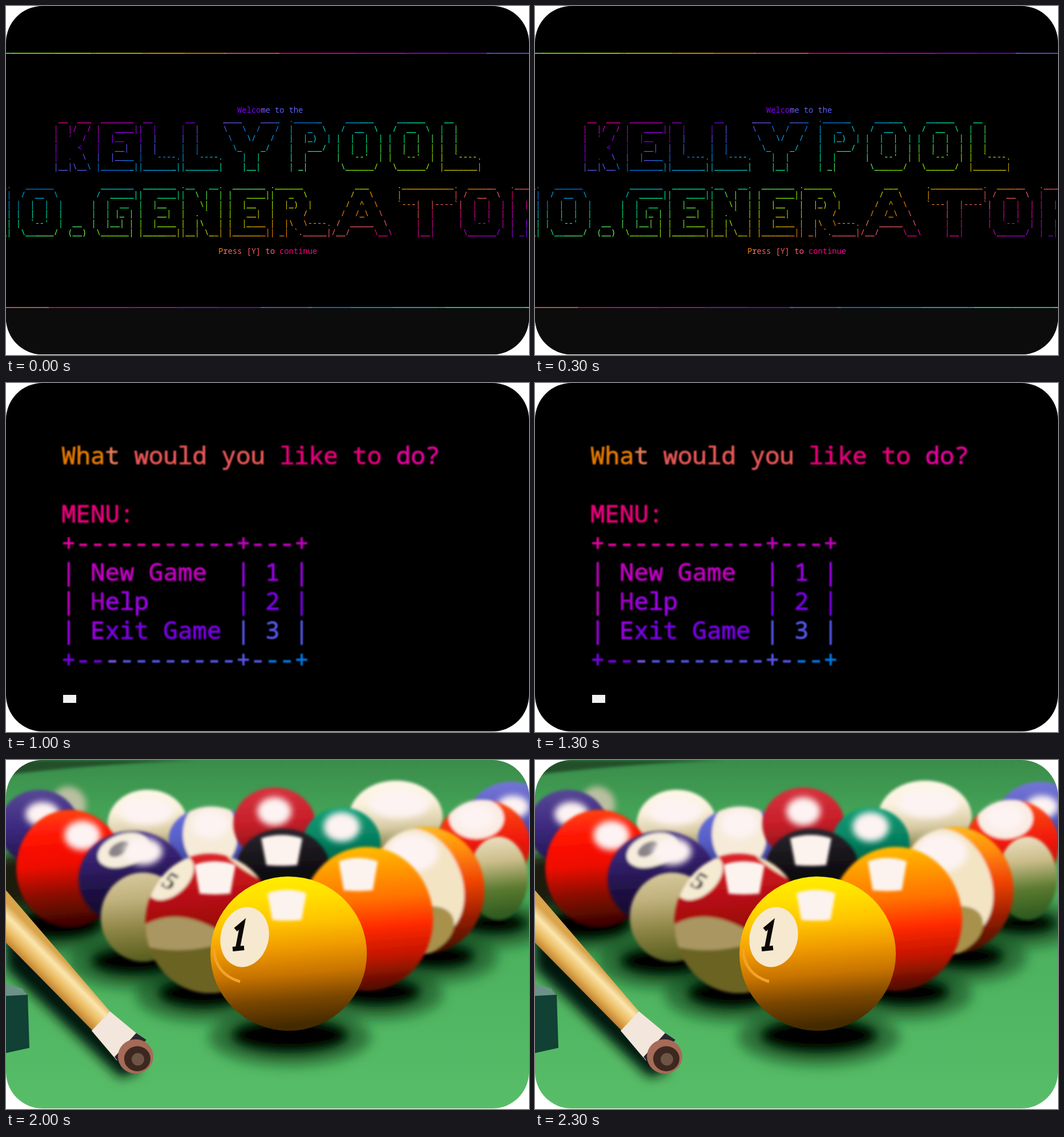
Write an HTML page that moves like this. It is 916 by 611 pixels and loops after 2.5 s.

```html
<!DOCTYPE html>
<html lang="en">
<head>
<meta charset="utf-8">
<title>Pool number generator</title>
<style>
html, body { margin: 0; width: 100%; height: 100%; overflow: hidden; background: #fff; }
svg { display: block; width: 100vw; height: 100vh; }
text { white-space: pre; }
.mono { font-family: "Noto Sans Mono", "DejaVu Sans Mono", monospace; stroke-width: 0; }
.crt { filter: blur(.8px); opacity: .9; }
.crt .mono { stroke-width: .9; }
.ui { font: 8.9px "Open Sans", "Noto Sans", sans-serif; fill: #ccc; }
</style>
</head>
<body>
<svg viewBox="0 0 916 611" xmlns="http://www.w3.org/2000/svg">
<defs>
  <clipPath id="card"><rect width="916" height="610" rx="64"/></clipPath>
  <filter id="soft" x="-20%" y="-20%" width="140%" height="140%"><feGaussianBlur stdDeviation="2.5"/></filter>
  <filter id="hazy" x="-40%" y="-40%" width="180%" height="180%"><feGaussianBlur stdDeviation="6"/></filter>
  <filter id="shade" x="-40%" y="-60%" width="180%" height="220%"><feGaussianBlur stdDeviation="10"/></filter>
  <linearGradient id="cloth" x1="0" y1="0" x2="0" y2="1">
    <stop offset="0" stop-color="#3a8c4a"/><stop offset=".14" stop-color="#43a256"/>
    <stop offset=".6" stop-color="#4eb360"/><stop offset="1" stop-color="#58bd68"/>
  </linearGradient>
  <linearGradient id="wood" gradientUnits="userSpaceOnUse" x1="70" y1="395" x2="108" y2="357">
    <stop offset="0" stop-color="#b9782a"/><stop offset=".35" stop-color="#e9b85c"/>
    <stop offset=".7" stop-color="#fbe6ae"/><stop offset="1" stop-color="#d9a44c"/>
  </linearGradient>
</defs>
<g clip-path="url(#card)">
  <g id="welcome"></g>
  <g id="rules"></g>
  <g id="menu"></g>
  <g id="editor"></g>
  <g id="table"></g>
</g>
</svg>

<script type="text/plain" id="glyphs">
K 9
 __  ___
|  |/  /
|  '  /
|    <
|  .  \
|__|\__\
E 9
 _______
|   ____|
|  |__
|   __|
|  |____
|_______|
L 9
 __
|  |
|  |
|  |
|  `----.
|_______|
Y 14
____    ____
\   \  /   /
 \   \/   /
  \_    _/
    |  |
    |__|
P 10
.______
|   _  \
|  |_)  |
|   ___/
|  |
| _|
O 11
  ______
 /  __  \
|  |  |  |
|  |  |  |
|  `--'  |
 \______/
N 10
.__   __.
|  \ |  |
|   \|  |
|  . `  |
|  |\   |
|__| \__|
. 5




 __
(__)
G 10
  _______
 /  _____|
|  |  __
|  | |_ |
|  |__| |
 \______|
R 13
.______
|   _  \
|  |_)  |
|      /
|  |\  \----.
| _| `._____|
A 14
     ___
    /   \
   /  ^  \
  /  /_\  \
 /  _____  \
/__/     \__\
T 13
.___________.
|           |
`---|  |----`
    |  |
    |  |
    |__|
</script>

<script>
const $ = id => document.getElementById(id);
const esc = s => s.replace(/&/g, '&amp;').replace(/</g, '&lt;');
const rect = (x, y, w, h, fill) => `<rect x="${x}" y="${y}" width="${w}" height="${h}" fill="${fill}"/>`;

// Terminal rainbow: three shifted sines snapped to the 6x6x6 colour cube
const LEVELS = [0, 95, 135, 175, 215, 255];
const COL_DEG = 2.1486, ROW_DEG = 17.189;

function rainbow(deg) {
  const channel = shift => LEVELS[Math.floor(6 * (Math.sin((deg + shift) * Math.PI / 180) * 127 + 128) / 256)];
  return `rgb(${[0, 120, 240].map(channel)})`;
}

// Splits a line into runs of one colour and hands each run to draw()
function runs(str, col, row, hue, draw) {
  const color = i => rainbow(hue + COL_DEG * (col + i) + ROW_DEG * row);
  let out = '';
  for (let i = 0, j; i < str.length; i = j) {
    j = i + 1;
    while (j < str.length && color(j) === color(i)) j++;
    out += draw(str.slice(i, j), col + i, color(i));
  }
  return out;
}

// grid: x, y of the first cell's baseline, pitch, lead, hue
function terminal(lines, g) {
  const body = lines.map(([row, col, str]) => runs(str, col, row, g.hue, (s, c, fill) =>
    s.trim() ? `<text x="${(g.x + c * g.pitch).toFixed(2)}" y="${(g.y + row * g.lead).toFixed(2)}" fill="${fill}" stroke="${fill}">${esc(s)}</text>` : ''));
  return `<g class="mono" font-size="${g.pitch / 0.6}">${body.join('')}</g>`;
}

const block = (str, col) => str.split('\n').slice(1).map((s, row) => [row, col, s]);

// Welcome screen
const font = {};
const src = $('glyphs').textContent.split('\n').slice(1);
for (let i = 0; i + 6 < src.length; i += 7) {
  const [name, width] = src[i].split(' ');
  font[name] = src.slice(i + 1, i + 7).map(s => s.padEnd(+width));
}
const banner = (word, row, col) => [0, 1, 2, 3, 4, 5].map(r =>
  [row + r, col, [...word].map(ch => font[ch][r]).join('')]);

const g0 = { x: 1.2, y: 186.5, pitch: 8.24, lead: 16.5, hue: 198.6 - 54 * COL_DEG };
const rule = (row, y) => runs('-'.repeat(113), -1, row, g0.hue, (s, c, fill) =>
  rect(g0.x + c * g0.pitch, y, s.length * g0.pitch, 1.5, fill));

$('welcome').innerHTML = rect(0, 0, 916, 611, '#000') + rect(0, 528, 916, 83, '#0c0c0c') +
  rule(-6, 82) + rule(21, 527) +
  terminal([
    [0, 49, 'Welcome to the'],
    ...banner('KELLYPOOL', 1, 10),
    ...banner('NO.GENERATOR', 8, -8),
    [15, 45, 'Press [Y] to continue']
  ], g0);

// Rules screen
const stars = '*'.repeat(33);
const rules = `
This app:
w game on the App
he number of players and enter in their name.
will generate and allocate numbers to each player.
 app to the correct person when their name appears on the screen
rget to say 'Done' when you have finished memorizing your ball.

********

 Kelly Pool:
e is designed for 3-15 players from the age of 7+
 app to enter in the players names to produce a number.
umber has been allocated and shown (secretly) to each player you may begin the game
  table should have 15 coloured balls with numbers and one white ball with no numbers.
he white ball at the D and the remainder coloured balls in the shape of a triangle pointing to the last black
 table is set up, the first player should break the balls from the D and then pass the cue to the next person
yer will have a go until it returns to the first player for a second go

all has been sunk by another player, you are out of the game
her players balls have been sunk and yours still remains, you WIN the game!



${stars}
ack to the main menu, click ENTER
${stars}`;
$('rules').innerHTML = rect(0, 0, 916, 611, '#000') +
  terminal(block(rules, -1), { x: 1, y: 84, pitch: 8.68, lead: 17.375, hue: 198.6 - 47 * COL_DEG - 12 * ROW_DEG });

// Menu screen
const menu = `
What would you like to do?

MENU:
+-----------+---+
| New Game  | 1 |
| Help      | 2 |
| Exit Game | 3 |
+-----------+---+`;
$('menu').innerHTML = rect(0, 0, 916, 611, '#000') + '<g class="crt">' +
  terminal(block(menu, 0), { x: 97, y: 142, pitch: 25.5, lead: 51, hue: 78.4 - 3 * COL_DEG }) + '</g>' +
  rect(100, 546, 23, 14, '#f2f2f2');

// Editor
const code = String.raw`
def player_names
  players = Array.new
  system 'clear'
  puts "How many players?"
  numPlayers = gets.strip.to_i
  system 'clear'


    if (numPlayers < 3)
      puts "Invalid entry\nMinimum number of players is 3.\Try again"
      sleep 2
      system 'clear'
      player_names

    end

    if (numPlayers > 15)
      puts "Invalid entry\nMaximum number of players is 15.\Try again."
      sleep 2
      system 'clear'
      player_names

    end


  # for (runs through once)
  i = 1

  puts "Please enter in #{numPlayers} player names."
  while i <= numPlayers do
    begin
       puts "Player #{i} name?"
       name = gets.chomp
        #raise an exception
       raise StandardError if name ==""
       #increment until we reach no. of players
       players.push (name)
        i += 1`;

const span = (s, fill) => `<tspan fill="${fill}">${esc(s)}</tspan>`;
const STRING = /(\\[nT])|(#\{|\})|((?<=#\{)\w+)|./g;
const TOKEN = /(["'].*?["'])|\b(if|end|while|begin|do|def|raise)\b|\b(puts|sleep|system|gets|strip|to_i|chomp|push|(?<=def )player_names)\b|\b(\d+)\b|\b(Array)\b|\b(new)\b|\b(StandardError)\b|\w+|\W/g;
const STRING_INK = ['#d7ba7d', '#569cd6', '#9cdcfe'];
const TOKEN_INK = ['', '#c586c0', '#dcdcaa', '#b5cea8', '#4ec9b0', '#4fa8e0', '#9cdcfe'];

const paint = (str, re, ink, base) => str.replace(re, (m, ...groups) => {
  const i = groups.slice(0, ink.length).findIndex(Boolean);
  if (i === 0 && !ink[0]) return paint(m, STRING, STRING_INK, '#ce9178');
  return span(m, i < 0 ? base : ink[i]);
});

const codeLines = block(code, 0).map(([row, , str]) => {
  const s = str.trimStart();
  if (!s) return '';
  const x = 4 + (str.length - s.length - 6) * 5.587;
  const body = s[0] === '#' ? span(s, '#6a9955') : paint(s, TOKEN, TOKEN_INK, '#d4d4d4');
  return `<text x="${x.toFixed(2)}" y="${(85.2 + row * 13.81).toFixed(2)}">${body}</text>`;
});

const label = (x, y, s, fill = '#ccc', extra = '') => `<text class="ui" x="${x}" y="${y}" style="fill:${fill}" ${extra}>${s}</text>`;
const dot = (x, y) => `<circle cx="${x}" cy="${y}" r="4.2" fill="#cc3e44"/>`;
const tab = (x, w, tx, name, on) => rect(x, 22, w, 25, on ? '#1e1e1e' : '#2d2d2d') +
  dot(tx - 9, 34.3) + label(tx, 38, name, on ? '#fff' : '#969696');

$('editor').innerHTML = rect(0, 0, 916, 611, '#1e1e1e') +
  rect(0, 0, 916, 22, '#3c3c3c') + rect(0, 22, 916, 25, '#252526') +
  [[41, 'Go'], [64, 'Run'], [92, 'Terminal'], [140, 'Help']].map(([x, s]) => label(x, 14, s)).join('') +
  label(456.5, 14, 'people.rb - assignment [QVT: Ubuntu-18.04] - Candle Script Desk', '#ccc', 'text-anchor="middle"') +
  tab(0, 83, 20, 'menu.rb') + tab(84, 87, 107, 'people.rb', true) +
  tab(172, 110, 195, 'ball_numbers.rb') + tab(283, 85, 305, 'error.rb') +
  '<path d="M156 31l6 6m0-6l-6 6" stroke="#ddd"/>' +
  dot(-2, 55) + label(8, 58, 'people.rb', '#a9a9a9') +
  rect(0, 63, 916, 2, '#151515') +
  rect(0, 434, 916, 1, '#2b2b2b') + rect(0, 447, 916, 1, '#2b2b2b') +
  rect(4, 503, 1, 97, '#404040') +
  `<g class="mono" font-size="${5.587 / 0.6}">${codeLines.join('')}</g>`;

// Billiard table
let defs = '', balls = 0;
function ball(cx, cy, rx, ry, tones, inner = '', blur = true) {
  const id = 'ball' + balls++;
  const stops = tones.map((c, i) => `<stop offset="${i / (tones.length - 1)}" stop-color="${c}"/>`).join('');
  const shape = `<ellipse cx="${cx}" cy="${cy}" rx="${rx}" ry="${ry}"`;
  defs += `<linearGradient id="${id}" x1="0" y1="0" x2=".08" y2="1">${stops}</linearGradient><clipPath id="${id}c">${shape}/></clipPath>`;
  return `<g${blur ? ' filter="url(#soft)"' : ''}>${shape} fill="url(#${id})"/><g clip-path="url(#${id}c)">${inner}</g></g>`;
}
const oval = (cx, cy, rx, ry, fill, turn = 0, extra = '') =>
  `<ellipse cx="${cx}" cy="${cy}" rx="${rx}" ry="${ry}" fill="${fill}" transform="rotate(${turn} ${cx} ${cy})" ${extra}/>`;
const poly = (points, fill) => `<polygon points="${points}" fill="${fill}"/>`;
const glow = (cx, cy, w, h) =>
  `<path d="M${cx - w} ${cy - h * .8}Q${cx} ${cy - h * 1.25} ${cx + w} ${cy - h * .8}L${cx + w * .75} ${cy + h}Q${cx} ${cy + h * 1.1} ${cx - w * .75} ${cy + h}Z" fill="#fdf3ee" filter="url(#soft)"/>`;
const haze = (cx, cy, rx, ry) => oval(cx, cy, rx, ry, '#fdf3f2', 0, 'filter="url(#hazy)"');
// black core inside a wider dark green halo
const shadow = (cx, cy, rx, ry) =>
  oval(cx, cy + 3, rx + 38, ry + 20, '#0d4a1e', 0, 'opacity=".6"') + oval(cx, cy, rx, ry, '#000');

const cream = ['#fff8ea', '#fbf1dc', '#d8cba4', '#6f7434'];
const scene =
  rect(0, 0, 916, 611, 'url(#cloth)') +
  '<path d="M0 0H330Q150 8 0 26Z" fill="#23502a" filter="url(#soft)"/>' +
  '<g filter="url(#shade)">' +
    oval(455, 235, 390, 75, '#04140a') + oval(20, 215, 60, 50, '#1c1a0c') +
    shadow(90, 288, 80, 28) + shadow(225, 352, 78, 26) + shadow(345, 408, 80, 28) +
    shadow(650, 406, 78, 26) + shadow(755, 343, 68, 24) + shadow(855, 286, 60, 20) +
    shadow(497, 482, 104, 31) +
    poly('0,300 40,330 235,545 200,556 0,365', '#04140a') + '</g>' +
  oval(112, 74, 30, 26, '#b9bfa0', 40, 'filter="url(#hazy)"') +
  ball(58, 118, 70, 66, ['#5a4a98', '#3d2a80', '#21124c']) + haze(64, 95, 30, 22) +
  ball(885, 100, 75, 62, ['#7678d8', '#5a5cc0', '#34358c']) + haze(888, 82, 28, 20) +
  ball(248, 112, 70, 60, cream) + haze(246, 90, 48, 24) +
  ball(683, 100, 82, 64, cream) + haze(688, 76, 54, 26) +
  ball(360, 138, 75, 56, ['#6a72dc', '#5860c8', '#3a3c8c'], oval(358, 130, 48, 62, '#f6ead8')) + haze(358, 112, 34, 26) +
  ball(470, 112, 72, 64, ['#d63540', '#c81f2a', '#7c1014']) + haze(470, 90, 30, 25) +
  ball(588, 145, 68, 62, ['#12a078', '#058060', '#044834']) + haze(588, 117, 32, 26) +
  ball(836, 148, 82, 78, ['#ff5a1c', '#f01a08', '#a80c04'], oval(824, 102, 48, 36, '#fbece2')) + haze(822, 100, 34, 24) +
  ball(862, 207, 52, 73, ['#efe3c6', '#cbbd8a', '#5c7a30', '#2e5a20']) +
  ball(112, 190, 94, 103, ['#ff4a12', '#ff1505', '#ee0805', '#8a0804', '#3c0602']) + haze(134, 132, 32, 26) +
  ball(485, 190, 82, 70, ['#2c2830', '#121014', '#000']) + glow(483, 158, 36, 26) +
  ball(222, 208, 95, 84, ['#4c3690', '#34206c', '#1c0f40', '#120a26'],
    oval(205, 158, 46, 28, '#f5ecdc', -20) + oval(198, 156, 20, 11, '#8a8488', -30)) + haze(240, 160, 34, 24) +
  ball(240, 275, 74, 78, ['#d9cba0', '#c0b07c', '#8c8444', '#5a6020']) +
  ball(735, 228, 103, 111, ['#ffc21a', '#ff8a08', '#f04406', '#a02004', '#4c1002'],
    oval(728, 215, 70, 98, '#f3e4c4', -22) + oval(728, 300, 60, 40, '#a8924c', -25)) + haze(712, 162, 46, 34) +
  ball(632, 278, 116, 126, ['#ffc400', '#ff9a00', '#ff7200', '#ff2a04', '#c41402', '#5a1002']) + glow(617, 200, 34, 28) +
  ball(357, 286, 113, 122, ['#e0262c', '#b80e14', '#8c0608', '#600404'],
    oval(428, 183, 56, 14, '#f3e2c4', 32) +
    '<path d="M240 290Q300 255 375 300L470 300V420H240Z" fill="#a99660"/>' +
    '<path d="M240 325Q310 345 400 315V420H240Z" fill="#6a6324"/>' +
    oval(288, 206, 48, 30, '#f5ead2', -42) +
    '<text x="277" y="226" font-family="Liberation Serif,serif" font-size="44" font-weight="700" font-style="italic" transform="rotate(28 287 210)">5</text>') + glow(366, 206, 36, 28) +
  ball(495, 339, 137, 135, ['#fff000', '#ffe000', '#ffc400', '#f09a00', '#c87400', '#7a4600', '#442a00'],
    '<path d="M364 330Q366 375 410 388" fill="none" stroke="#f0a428" stroke-width="5"/>' +
    oval(418, 310, 42, 53, '#f6e9d0', 14), false) + glow(492, 254, 34, 26) +
  '<path d="M402 297L414 287L406 328M397 331L417 329" fill="none" stroke="#0c0806" stroke-width="8"/>' +
  poly('0,228 182,440 152,474 0,320', 'url(#wood)') +
  poly('182,440 240,488 194,526 150,474', '#f3e6dc') +
  poly('228,478 246,490 200,532 190,520', '#2a2630') +
  oval(227, 519, 31, 30, '#a66a58') + oval(230, 523, 23, 22, '#3c2820') + oval(231, 524, 11, 11, '#6e5444') +
  poly('0,392 28,400 38,413 0,416', '#6c9288') +
  poly('0,413 38,411 41,504 0,513', '#114034');
$('table').innerHTML = `<defs>${defs}</defs>${scene}`;

// Slide show
const slides = ['welcome', 'rules', 'menu', 'editor', 'table'].map($);
const HOLD = 500;

function show(t) {
  const now = Math.floor(t / HOLD) % slides.length;
  slides.forEach((s, i) => s.setAttribute('display', i === now ? 'inline' : 'none'));
}
function tick() {
  show(performance.now());
  requestAnimationFrame(tick);
}
tick();
</script>
</body>
</html>
```
